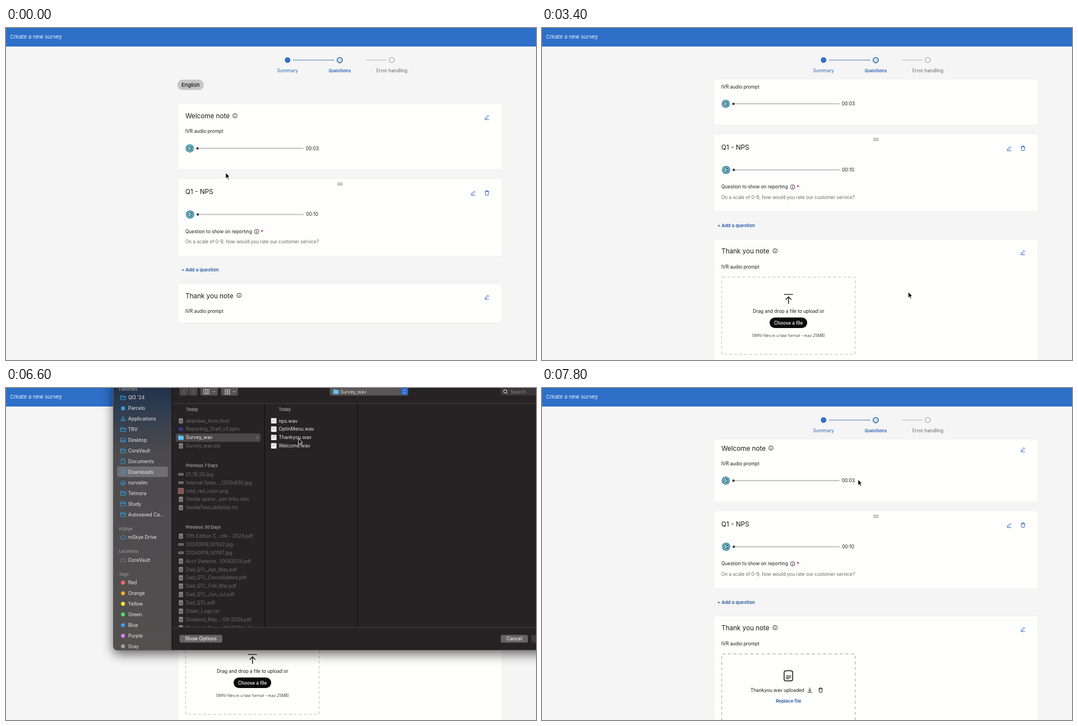
Animation, 946 px wide and 592 px high, one loop 8 s. Source, as an HTML page:

```html
<!DOCTYPE html>
<html lang="en">
<head>
<meta charset="utf-8">
<title>Create a new survey</title>
<style>
html, body { margin: 0; height: 100%; overflow: hidden; background: #f5f5f5; }
svg { display: block; width: 100vw; height: 100vh; }
text { font-family: Inter, Roboto, sans-serif; white-space: pre; }
.line { fill: none; stroke-width: 1; stroke-linejoin: round; stroke-linecap: round; }
#dialog { --text: #eae8e8; --head: #928f8f; --icon: #2fa0ea; --tag: 1; }
#dialog.idle { --text: #b0acab; --head: #aaa6a6; --icon: #47779f; --tag: .62; }
#dialog.empty { --text: #827d7b; --head: #8c8886; --icon: #2c6596; --tag: .65; }
.side { fill: var(--text); }
.head { fill: var(--head); }
.sideIcon { stroke: var(--icon); }
.tag { opacity: var(--tag); }
#frame { filter: drop-shadow(0 7px 10px rgba(0, 0, 0, .6)); }
</style>
</head>
<body>
<script>
const W = 946, H = 592, LOOP = 8000, STEP = 200;
const BLUE = '#2e6fc8', LINK = '#22579f', INK = '#1b1b1b';

// Drawing helpers; text is placed by its vertical centre.
const text = (x, y, s, size = 8.33, fill = INK, weight = 400, anchor = 'start', cls = '') =>
  `<text x="${x}" y="${y + size * .36}" font-size="${size}" ${cls ? `class="${cls}"` : `fill="${fill}"`} font-weight="${weight}" text-anchor="${anchor}">${s}</text>`;
const mid = (x, y, s, size, fill, weight) => text(x, y, s, size, fill, weight, 'middle');
const box = (x, y, w, h, fill, r = 0, more = '') =>
  `<rect x="${x}" y="${y}" width="${w}" height="${h}" rx="${r}" fill="${fill}" ${more}/>`;
const dot = (x, y, r, fill, more = '') => `<circle cx="${x}" cy="${y}" r="${r}" fill="${fill}" ${more}/>`;
const path = (x, y, d, stroke, more = '') =>
  `<path class="line" transform="translate(${x} ${y})" d="${d}" stroke="${stroke}" ${more}/>`;
const group = (id, body, more = '') => `<g id="${id}" ${more}>${body}</g>`;

// Survey page
const card = (id, y, h) => box(306, y, 579.5, h, '#fefefd', 4, `id="${id}" stroke="#e9e9e9" stroke-width=".8"`);
const info = (x, y) => dot(x, y, 3.9, 'none', 'stroke="#222" stroke-width=".9"') + path(x, y, 'M0-.3V2M0-2v.1', '#222');
const pencil = y => x => path(x, y, 'M-3 1.2L1.6-3.4L3.2-1.8L-1.4 2.8L-3.3 3.1ZM-3.3 4.4H3.4', '#2b62b5', 'style="stroke-width:.9"');
const trash = (x, y, c = '#2b62b5') =>
  path(x, y, 'M-3.4-2.5H3.4M-1.4-2.5V-4H1.4V-2.5M-2.7-2.5V3.2Q-2.7 4-1.8 4H1.8Q2.7 4 2.7 3.2V-2.5', c);
const player = (x, y, time) =>
  dot(x, y, 7.3, '#2d7b91') + dot(x, y, 5.3, 'none', 'stroke="#d8edf2" stroke-width="1"') +
  path(x, y, 'M-1.5-2.6L2.6 0L-1.5 2.6Z', '#fff') +
  box(x + 13, y - 1.1, 190, 2.2, '#c6c6c6', 1) + dot(x + 13.7, y, 2.2, '#444') +
  text(x + 207, y, time);
const zone = (id, dash, width, body) => group(id,
  box(320.7, 523.7, 238.4, 137.6, 'none', 1, `class="dash" stroke="#b9b9b9" stroke-width="${width}" stroke-dasharray="${dash}"`) + body);

const grip = [592.8, 596, 599.2].map(x => dot(x, 276.5, .85, '#222') + dot(x, 279.6, .85, '#222')).join('');
const content =
  box(306, 92, 47, 18.6, '#c5c5c5', 9.3) + mid(329.4, 101.3, 'English', 9.3, '#111', 500) +
  card('', 135, 118) + text(320.2, 157, 'Welcome note', 11.7) + info(408.7, 156.5) + pencil(159)(858.5) +
  text(320, 184.5, 'IVR audio prompt') + player(328, 214.7, '00:03') +
  card('', 268, 139) + grip + text(320, 292, 'Q1 - NPS', 11.8) + pencil(294)(834) + trash(858.5, 294) +
  player(328.6, 332.5, '00:10') +
  text(320, 363, 'Question to show on reporting') + info(447.3, 363) + text(454.5, 363.5, '*', 9, '#b3122b', 600) +
  text(320, 381.5, 'On a scale of 0-9, how would you rate our customer service?', 8.28, '#6b6b6b') +
  text(313, 431.5, '+ Add a question', 8.2, LINK, 600) +
  card('last', 456, 70) + text(320.2, 477.3, 'Thank you note', 11.7) + info(416, 476.8) + pencil(479.5)(858.5) +
  text(320, 505.3, 'IVR audio prompt') +
  zone('upload', '5 4', 1,
    path(440, 554.6, 'M-7.5 0H7.5M0 4.5V16.5M-4.7 9L0 4.2L4.7 9', '#111', 'style="stroke-width:1.4"') +
    mid(440, 585, 'Drag and drop a file to upload or') +
    box(406.2, 595.7, 67.2, 18.8, '#0b0b0b', 9.4, 'id="choose"') + mid(439.8, 605.4, 'Choose a file', 8.25, '#fff', 500) +
    mid(440, 627.5, '(WAV files in u-law format - max 25MB)', 7, '#444')) +
  zone('done', '5.5 4.5', 1.4,
    box(432.2, 553.8, 15.2, 18, 'none', 3, 'stroke="#111" stroke-width="1.5"') +
    path(440, 563, 'M-4.2-.5H4.2M-4.2 2.2H4.2M-4.2 4.9H1', '#111', 'style="stroke-width:1.2"') +
    text(372.3, 588.3, 'Thankyou.wav uploaded', 8.27) +
    path(478, 588, 'M0-4V2M-2.5-.3L0 2.2L2.5-.3M-3.6 4H3.6', '#222') + trash(497.3, 588.2, '#222') +
    mid(440, 607.4, 'Replace file', 8.15, LINK, 600));

const page =
  box(0, 0, W, H, '#f5f5f5') +
  `<g clip-path="url(#below)">${group('content', content)}</g>` +
  box(0, 0, W, 33, BLUE) + text(7.2, 15.3, 'Create a new survey', 9.55, '#eef4fc') +
  dot(502.6, 57.3, 5, BLUE) + path(512.5, 57.3, 'M0 0H73', '#4d7bb8') +
  dot(595.7, 57.3, 4.7, '#c3e2f3', 'stroke="#184a80" stroke-width="1.3"') +
  path(643, 57.3, 'M0 0H35.5', '#b0b0b0') + dot(688.6, 57.3, 4.5, 'none', 'stroke="#999" stroke-width="1.1"') +
  mid(502.5, 75.8, 'Summary', 8.33, '#2f69b8') + mid(595.7, 75.8, 'Questions', 8.05, '#2563b4', 600) +
  mid(688.7, 75.8, 'Error handling', 8.33, '#666');

// File dialog
const FOLDER = 'M-4.3-3.6H-1L0-2.4H4.3V3.6H-4.3ZM-4.3-.9H4.3';
const shapes = {
  folder: FOLDER,
  apps: 'M-4.2 2.5H4.2M0-4L-2.8 3.8M0-4L2.8 3.8',
  desk: 'M-4.2-3.2H4.2V3H-4.2ZM-4.2 1H4.2',
  doc: 'M-3-4.3H.8L3-2V4.3H-3ZM.8-4.3V-2H3',
  down: 'M4.2 0A4.2 4.2 0 1 1-4.2 0A4.2 4.2 0 1 1 4.2 0M0-2.2V2M-1.6.5L0 2L1.6.5',
  home: 'M-4.5 0L0-4.2L4.5 0M-3.2-1V4H-1V1H1V4H3.2V-1',
  cloud: 'M-3 3H3.2A2 2 0 0 0 3.4-1A3.2 3.2 0 0 0-2.6-1.4A2.2 2.2 0 0 0-3 3Z'
};
const sideRow = (y, label, icon) =>
  (icon === 'square' ? box(205.7, y - 3, 6.5, 6.5, 'var(--icon)') :
    `<path class="line sideIcon" transform="translate(209 ${y})" d="${shapes[icon]}"/>`) +
  text(218, y, label, 8.55, '', 400, 'start', 'side');
const sideHead = (y, s) => text(201.7, y, s, 7.4, '', 600, 'start', 'head');

const favourites = [
  ["Ql3 '24", 'folder'], ['Parcelo', 'square'], ['Applications', 'apps'], ['TRV', 'folder'],
  ['Desktop', 'desk'], ['CoreVault', 'folder'], ['Documents', 'doc'], ['Downloads', 'down'],
  ['norvelim', 'home'], ['Telmora', 'folder'], ['Study', 'folder'], ['Autosaved Ca...', 'folder']];
const tags = { Red: '#ff6a63', Orange: '#fbad25', Yellow: '#fde735', Green: '#52dc6b', Blue: '#409ff2', Purple: '#e27df8', Gray: '#a2a0a0' };

const sidebar =
  box(198, 140, 91, 18.8, 'rgba(255,255,255,.2)', 4, 'id="place"') +
  sideHead(2, 'Favorites') + favourites.map(([s, i], n) => sideRow(17.2 + n * 18.93, s, i)).join('') +
  sideHead(251, 'mSkye') + sideRow(266, 'mSkye Drive', 'cloud') +
  sideHead(291.7, 'Locations') + `<g style="--icon:#858282">${sideRow(306.6, 'CoreVault', 'cloud')}</g>` +
  sideHead(332, 'Tags') +
  Object.entries(tags).map(([s, c], n) => {
    const y = 347 + n * 18.93;
    return dot(208.8, y, 3.5, c, 'class="tag"') + text(218, y, s, 8.55, '', 400, 'start', 'side');
  }).join('');

const fileIcon = (x, y, kind) => ({
  d: box(x - 3.7, y - 4.6, 7.4, 9.4, '#858181', 1) + path(x, y, 'M-1.8 0H1.8M-1.8 2H1.8', '#4a4546'),
  i: box(x - 4.7, y - 2, 9.4, 4.2, '#8a8786') + box(x - 3.8, y - .8, 7.6, 1.6, '#4b4647'),
  r: box(x - 4.7, y - 4.7, 9.4, 9.4, '#875453', 0, 'stroke="#a18583" stroke-width=".7"'),
  p: box(x - 4, y - 3, 8, 6, '#353a85'),
  f: box(x - 4.8, y - 4, 4.5, 3, '#45a8e0', 1) + box(x - 4.8, y - 3, 9.6, 7.3, '#62c3f2', 1),
  w: box(x - 4.8, y - 4.8, 9.6, 9.6, '#f4f4f4', .5) + path(x, y, 'M-1.6 2V-1.7L1.8-2.3V1.5', '#b5b5b5')
})[kind];
const files = (x, y, list, fill) => list.map(([s, kind], n) => {
  const cy = y + n * 14.87;
  return fileIcon(x, cy, kind) + text(x + 8.8, cy, s, 8.5, kind === 'f' ? '#f2f0f0' : fill);
}).join('');
const listHead = (x, y, s) => text(x, y, s, 7.4, '#a39e9e', 600);
const DIM = '#716c6c';
const docs = ['17th Edition C...rds - 2024.pdf', '20240919_141142.jpg', '20240919_141147.jpg', 'Acct Stateme...10092024.pdf',
  'Dad_QTL_Apr_May.pdf', 'Dad_QTL_Consolidated.pdf', 'Dad_QTL_Feb_Mar.pdf', 'Dad_QTL_Jun_Jul.pdf', 'Dad_QTL.pdf',
  'Dialer_Logs.txt', 'Dividend_Rep...-09-2024.pdf', 'Dividend_Rep...-08-2024.pdf'];

const lists =
  box(303, 81, 151.5, 15, '#4b4748', 3) + path(448.8, 88.4, 'M-.8-2L1 0L-.8 2', '#aaa') +
  listHead(321, 38, 'Today') +
  files(312.2, 58.5, [['attendee_form.html', 'd'], ['Reporting_Draft_v3.pptx', 'p'], ['Survey_wav', 'f'], ['Survey_wav.zip', 'd']], DIM) +
  listHead(321, 138, 'Previous 7 Days') +
  files(312.2, 153.8, [['01_18_00.jpg', 'i'], ['Internal Spea..._1200x630.jpg', 'i'], ['mild_red_color.png', 'r'],
    ['Vonda space...join links.xlsx', 'd'], ['VondaTwoLabSetup.txt', 'd']], DIM) +
  listHead(321, 248, 'Previous 30 Days') +
  files(312.2, 264, docs.map(s => [s, s.endsWith('jpg') ? 'i' : 'd']), DIM) +
  path(627.5, 28, 'M0 0V399', '#0d0a0a') +
  box(469, 81, 151, 15, '#4b4748', 3, 'id="picked"') +
  listHead(486.7, 38, 'Today') +
  files(478, 58.5, ['nps.wav', 'OptinMenu.wav', 'Thankyou.wav', 'Welcome.wav'].map(s => [s, 'w']), '#eae7e7');

const rows = ['Created', 'Modified', 'Duration', 'Audio channels', 'Sample rate'];
const note = `<g fill="#cbcbcb"><path d="M785 108Q785 104 789 103L850 89Q854 88 854 92V178H845V116L794 128V191H785Z"/>
  <ellipse cx="776" cy="191" rx="18.5" ry="14.5" transform="rotate(-22 776 191)"/>
  <ellipse cx="836" cy="178.5" rx="18.5" ry="14.5" transform="rotate(-22 836 178.5)"/></g>`;
const preview =
  box(701, 35.5, 225, 224.2, 'url(#paper)') + note +
  text(634, 284.5, 'Thankyou.wav', 9.6, '#e8e5e5', 600) + text(634, 298.5, 'Waveform audio - 32 KB', 8.5, '#a8a3a3') +
  text(634, 314.5, 'Information', 8.6, '#eeebeb', 600) +
  rows.map((s, n) => {
    const y = 330 + n * 15.55;
    return text(634, y, s, 7.35, '#aaa5a5', 500) + (n < 4 ? path(634.5, y + 7.8, 'M0 0H312', '#454040', 'style="stroke-width:.7"') : '') +
      (n < 2 ? text(841, y, 'Thursday, 28 September 2023', 7.35, '#e8e5e5', 600) : '');
  }).join('') +
  text(634, 413, 'Tags', 8.6, '#eeebeb', 600) + text(634, 428.5, 'Add Tags...', 8, '#716c6c');

const button = (x, w, s) => box(x, 440.3, w, 13.7, '#676263', 3) + mid(x + w / 2, 447.2, s, 8.5, '#f0eeee', 500);
const tool = (x, w, fill = '#565152') => box(x, -4, w, 17.6, fill, 3);
const grid = [390.5, 394, 397.5].map(x => [2.2, 5.7, 9.2].map(y => box(x, y, 2.4, 2.4, '#c5c1c1')).join('')).join('');
const toolbar =
  tool(309.7, 15.5, '#4c4748') + tool(326.3, 15.2, '#4c4748') +
  path(317.5, 6.5, 'M1.5-3L-1.5 0L1.5 3', '#777') + path(334, 6.5, 'M-1.5-3L1.5 0L-1.5 3', '#777') +
  tool(347.3, 30.7) + path(358, 6.5, 'M-4.5-3.7H4.5V3.7H-4.5ZM-1.5-3.7V3.7M1.5-3.7V3.7', '#d0cccc') + path(371, 6.5, 'M-2-1L0 1L2-1', '#d0cccc') +
  tool(384, 30) + grid + path(407, 6.5, 'M-2-1L0 1L2-1', '#d0cccc') +
  tool(578, 140, '#5a5556') + fileIcon(589, 6.5, 'f') +
  text(596.5, 6.5, 'Survey_wav', 8.4, '#dedada', 400, 'start', '').replace('<text', '<text id="where"') +
  box(705.3, .3, 11.8, 12, '#2468d8', 2.5, 'id="spin"') + path(711.2, 6.5, 'M-2-1.3L0-3.4L2-1.3M-2 1.3L0 3.4L2 1.3', '#e5e2e2') +
  box(882.5, -4, 70, 17.6, '#3b3637', 3) + dot(891, 6, 2.9, 'none', 'stroke="#c5c1c1" stroke-width="1.1"') +
  path(893.2, 8.2, 'M0 0L2.5 2.5', '#c5c1c1') + text(900.5, 6.8, 'Search', 8.4, '#8b8686');

const OUTLINE = 'M191.5-30H980V467.5H199.5Q191.5 467.5 191.5 459.5Z';
const dialog =
  `<path id="frame" d="${OUTLINE}" fill="#272223"/><g clip-path="url(#shell)">` +
  box(191, 0, 105, 468, '#302b2b') + box(191, 0, 105, 468, 'url(#glass)', 0, 'id="glassy"') + sidebar +
  box(295.5, 0, 1, 468, '#0f0c0c') + toolbar +
  path(296, 27.7, 'M0 0H660', '#453f40') + path(461.5, 28, 'M0 0V399', '#0d0a0a') +
  `<g clip-path="url(#panes)">${group('lists', lists)}${group('preview', preview)}</g>` +
  path(296, 427, 'M0 0H660', '#453f40') +
  button(309.7, 76.3, 'Show Options') + button(883, 48.7, 'Cancel') + box(937.5, 440.3, 30, 13.7, '#413c3d', 3) +
  `</g><path d="${OUTLINE}" fill="none" stroke="#6d6969" stroke-width=".8"/>`;

const pointer = '<path d="M0 0V10.6L2.4 8.4L4.2 12.2L6 11.4L4.3 7.7L7.6 7.5Z" fill="#0a0a0a" stroke="#fff" stroke-width=".9" stroke-linejoin="round"/>';

document.body.innerHTML = `<svg viewBox="0 0 ${W} ${H}" xmlns="http://www.w3.org/2000/svg"><defs>
  <clipPath id="below"><rect y="92" width="${W}" height="500"/></clipPath>
  <clipPath id="panes"><rect x="296" y="28" width="650" height="398.6"/></clipPath>
  <clipPath id="shell"><path d="${OUTLINE}"/></clipPath>
  <linearGradient id="glass" x2="0" y2="1"><stop stop-color="#23324a"/><stop offset=".06" stop-color="#2c3a50"/>
    <stop offset=".24" stop-color="#4b4a4d"/><stop offset="1" stop-color="#535050"/></linearGradient>
  <linearGradient id="paper" x2="0" y2="1"><stop stop-color="#f8f8f8"/><stop offset="1" stop-color="#ececec"/></linearGradient>
  </defs>${page}${group('dialog', dialog)}${group('pointer', pointer)}</svg>`;

// Motion: [time, value...] keys with straight runs between them
const scrollKeys = [[0, 0], [2000, 0], [2600, 27], [3200, 79.5], [7400, 79.5], [7800, 49.5]];
const pointerKeys = [[0, 392, 258], [600, 483, 475], [800, 483, 475], [1600, 856, 477], [2000, 856, 477],
  [2600, 692, 460], [3200, 692, 460], [4400, 462, 523.5], [4600, 462.7, 524.3], [5400, 462.7, 524.3],
  [6000, 470, 511], [6400, 522, 90], [7200, 522, 90], [7800, 564, 163]];
function at(keys, t) {
  const n = keys.findIndex(k => k[0] > t);
  if (n < 0) return keys[keys.length - 1].slice(1);
  const a = keys[n - 1], b = keys[n], p = (t - a[0]) / (b[0] - a[0]);
  return a.slice(1).map((v, i) => v + (b[i + 1] - v) * p);
}

const $ = id => document.getElementById(id);
const show = (id, on) => $(id).style.display = on ? '' : 'none';

function draw(t) {
  const open = t >= 1800, done = t >= 7400, loaded = t >= 5400, picked = t >= 6800, idle = t >= 7200;
  $('content').setAttribute('transform', `translate(0 ${-at(scrollKeys, t)[0]})`);
  $('pointer').setAttribute('transform', `translate(${at(pointerKeys, t).join(' ')})`);
  $('last').setAttribute('height', open ? 260 : 70);
  show('upload', open && !done);
  show('done', done);
  $('upload').querySelector('.dash').style.display = t >= 3400 ? '' : 'none';
  $('choose').setAttribute('fill', t >= 4400 && t < 5200 ? '#2e2e2e' : '#0b0b0b');
  show('dialog', t >= 5200 && !done);
  $('dialog').setAttribute('class', loaded ? (idle ? 'idle' : '') : 'empty');
  for (const id of ['lists', 'place', 'where', 'glassy']) show(id, loaded);
  show('spin', loaded && !idle);
  show('picked', picked);
  show('preview', picked);
}

const start = performance.now();
function tick() {
  const t = (performance.now() - start) % LOOP;
  draw(Math.floor(t / STEP) * STEP);
  requestAnimationFrame(tick);
}
tick();
</script>
</body>
</html>
```
